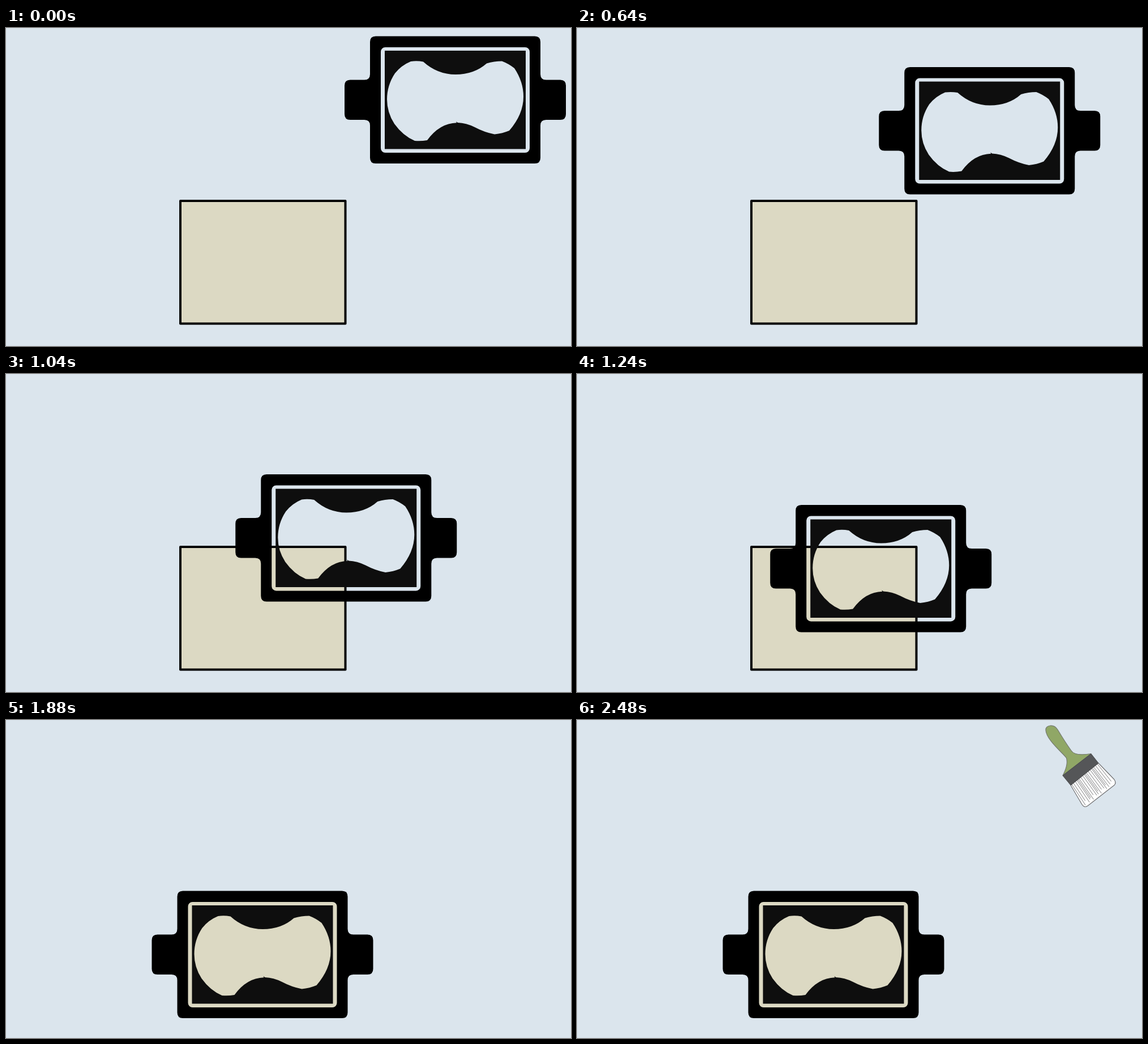
An HTML page with a canvas that plays this animation: 998 px wide and 561 px high, repeating every 2520 ms.

```html
<!DOCTYPE html>
<html lang="en">
<head>
<meta charset="utf-8">
<title>Stencil and brush</title>
<style>
  html, body { margin: 0; width: 100%; height: 100%; overflow: hidden; background: #dbe5ed; }
  canvas { display: block; }
</style>
</head>
<body>
<canvas id="stage" width="998" height="561"></canvas>
<script>
const ctx = document.getElementById('stage').getContext('2d');
const LOOP = 2520, STEP = 40;
const SLIDE = { start: 47, length: 1855, dx: -340.5, dy: 287 };
const FADE = { start: 1920, length: 520 };

const clamp01 = v => Math.min(1, Math.max(0, v));
const progress = (t, span) => clamp01((t - span.start) / span.length);
const smoother = u => u * u * u * (10 + u * (6 * u - 15));
const mix = (a, b, u) => a + (b - a) * u;

// Outer silhouette with side tabs and rounded inner corners
const casing = new Path2D(`M653 14.5 H934 Q944 14.5 944 24.5 V81.5
  Q944 91.5 954 91.5 H979 Q989 91.5 989 101.5 V152 Q989 162 979 162 H954
  Q944 162 944 172 V229 Q944 239 934 239 H653 Q643 239 643 229 V172
  Q643 162 633 162 H608 Q598 162 598 152 V101.5 Q598 91.5 608 91.5 H633
  Q643 91.5 643 81.5 V24.5 Q643 14.5 653 14.5 Z`);
casing.roundRect(662, 34, 263, 186, 8);

const plate = new Path2D(`M669 40 H918 V213.5 H669 Z
  M673 126 Q673 101 687 80 Q698 66 715 59 Q726 57.5 737 59.5
  Q762 82 794 82 Q827 82 849 62.5 Q862 58.5 876 58.5 Q888 63 898 71
  Q914 95 914 121 Q914 152 889 181 Q877 186 863 187.5 Q845 184 828 175
  Q813 167.5 798 167 L795 165 L796 167.3 Q766 168 744 198
  Q733 200 722 199 Q701 190 686 169 Q673 149 673 126 Z`);

const handle = new Path2D(`M858 98 Q868 79 864.5 67 C858 58 829 35 828 18
  C827 9 842 6 849 17 C858 32 865 43 873 54 Q879 64 908 59.5 Z`);
const ferrule = new Path2D('M908 59.5 L921 76 L872 115 L858 98 Z');
const bristles = new Path2D('M872 115 L892 149 Q896 155.5 902 151.5 L949 115 Q953 111 949 105 L921 76 Z');

function paint(path, fill, stroke, width = 1) {
  ctx.fillStyle = fill;
  ctx.fill(path);
  ctx.strokeStyle = stroke;
  ctx.lineWidth = width;
  ctx.stroke(path);
}

function drawSheet() {
  const sheet = new Path2D();
  sheet.rect(308, 305, 291.5, 216.5);
  ctx.lineJoin = 'round';
  paint(sheet, '#dcd9c3', '#000', 4);
}

function drawStencil(u) {
  ctx.save();
  ctx.translate(SLIDE.dx * u, SLIDE.dy * u);
  ctx.fillStyle = '#000';
  ctx.fill(casing, 'evenodd');
  ctx.fillStyle = '#0e0e0e';
  ctx.fill(plate, 'evenodd');
  ctx.restore();
}

function drawBrush(alpha) {
  if (!alpha) return;
  ctx.save();
  ctx.globalAlpha = alpha;
  paint(bristles, '#fff', '#707072', 1.2);
  ctx.strokeStyle = '#69696b';
  ctx.lineWidth = 0.9;
  ctx.beginPath();
  const count = 19;
  for (let i = 1; i < count; i++) {
    const u = (i + 0.3 * Math.sin(i * 5)) / count;
    const reach = 0.91 + 0.08 * Math.sin(i * 2.4);
    const x = mix(872, 921, u), y = mix(115, 76, u);
    ctx.moveTo(x, y);
    ctx.lineTo(mix(x, mix(897, 950, u), reach), mix(y, mix(153, 112, u), reach));
  }
  ctx.stroke();
  paint(handle, '#90a766', '#747a70', 1.2);
  paint(ferrule, '#555658', '#48494b');
  ctx.restore();
}

function render(now) {
  const t = Math.floor((now % LOOP) / STEP) * STEP;
  ctx.fillStyle = '#dbe5ed';
  ctx.fillRect(0, 0, 998, 561);
  drawSheet();
  drawStencil(smoother(progress(t, SLIDE)));
  drawBrush(progress(t, FADE));
}

function tick() {
  render(performance.now());
  requestAnimationFrame(tick);
}
tick();
</script>
</body>
</html>
```
